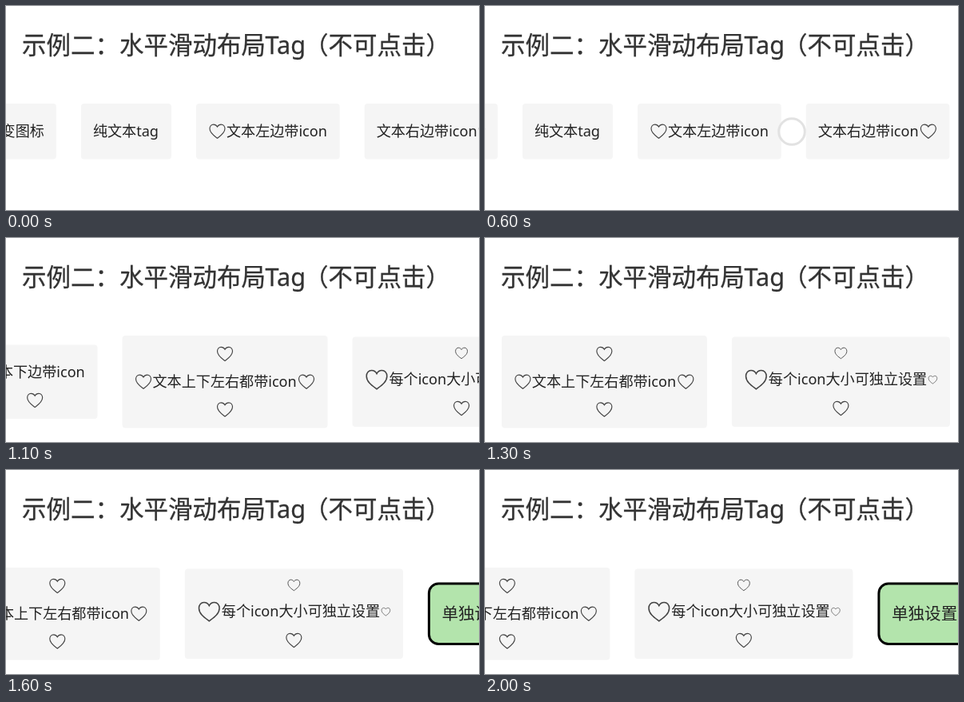
These frames come from a looping animation (592x255 px, 2.1 s). An HTML page:

```html
<!DOCTYPE html>
<html lang="zh-CN">
<head>
<meta charset="utf-8">
<style>
  html, body { margin: 0; width: 100%; height: 100%; overflow: hidden; background: #fff; }
  svg { display: block; }
  text { font-family: "Noto Sans", "Noto Sans CJK SC", "Noto Sans CJK", sans-serif; fill: #222; }
  .title text { font-size: 30.5px; fill: #333; stroke: #333; stroke-width: .3; }
  .heart { fill: none; stroke: #444; stroke-width: 1.15; }
</style>
</head>
<body>
<svg width="592" height="255" viewBox="0 0 592 255">
  <g class="title">
    <text x="20" y="60">示例二：水平滑动布局</text>
    <text x="324.5" y="60">Tag</text>
    <text x="373" y="60">（不可点击）</text>
  </g>
  <g id="strip"></g>
  <circle id="touch" cy="157" r="16.3" fill="#fff" fill-opacity=".75" stroke="#e2e2e2" stroke-width="3"/>
</svg>
<script>
const strip = document.getElementById('strip');
const touch = document.getElementById('touch');
const FONT = 18.1, ICON = 23, PAD_X = 15, PAD_Y = 11.5, ROW = 46.5, GAP = 31;
const VIEW = 592, LIST_TOP = 122;

const letterWidth = c => c > 'z' ? 1 : c === 'i' ? .41 : .53;
const textWidth = label => FONT * [...label].reduce((sum, c) => sum + letterWidth(c), 0);

const heart = (x, y, box) => box ?
  `<path class="heart" transform="translate(${x} ${y}) scale(${box / ICON})" d="M0 8.6
   C-4 5.6-9.5 2.1-9.5-3.4C-9.5-6.4-7.5-8.7-4.8-8.7C-2.6-8.7-.9-7.4 0-5.7
   C.9-7.4 2.6-8.7 4.8-8.7C7.5-8.7 9.5-6.4 9.5-3.4C9.5 2.1 4 5.6 0 8.6Z"/>` : '';

// A grey card sized by its label and the icons on its four sides.
function tag(label, { left = 0, right = 0, top = 0, bottom = 0 } = {}) {
  const textX = PAD_X + left;
  const textEnd = textX + textWidth(label);
  const row = Math.max(ROW, left + 17.5);
  const w = textEnd + right + PAD_X;
  const h = PAD_Y + top + row + bottom + PAD_Y;
  const midY = PAD_Y + top + row / 2;
  return { w, h, svg: `
    <rect width="${w}" height="${h}" rx="4" fill="#f5f5f5"/>
    <text x="${textX}" y="${midY + 6.2}" font-size="${FONT}">${label}</text>
    ${heart(PAD_X + left / 2, midY, left)}
    ${heart(textEnd + right / 2, midY, right)}
    ${heart(w / 2, PAD_Y + top / 2, top)}
    ${heart(w / 2, h - PAD_Y - bottom / 2, bottom)}` };
}

const styledTag = label => ({ w: 180, h: 78.5, svg: `
  <rect x="1.5" y="1.5" width="177" height="75.5" rx="12" fill="#b3e4ac" stroke="#000" stroke-width="3"/>
  <text x="17.5" y="46.5" font-size="20.6">${label}</text>` });

const tags = [
  tag('渐变图标'),
  tag('纯文本tag'),
  tag('文本左边带icon', { left: ICON }),
  tag('文本右边带icon', { right: ICON }),
  tag('文本上边带icon', { top: ICON }),
  tag('文本下边带icon', { bottom: ICON }),
  tag('文本上下左右都带icon', { left: ICON, right: ICON, top: ICON, bottom: ICON }),
  tag('每个icon大小可独立设置', { left: 31, right: 13, top: 18, bottom: ICON }),
  styledTag('单独设置样式')
];

let nextX = -39.5;
for (const t of tags) {
  t.x = nextX;
  nextX += t.w + GAP;
  t.node = document.createElementNS('http://www.w3.org/2000/svg', 'g');
  t.node.innerHTML = t.svg;
  strip.append(t.node);
}

// The strip rests, follows an accelerating finger, then glides to a stop.
const STEP = 100, LOOP = 2100, REST = 500, GLIDE = 4, END = 1148;
const drag = n => 47 * n ** 2.1;
const glide = n => END - 485 * Math.exp(-((n / 3.136) ** 1.033));

function draw(time) {
  const n = Math.max(0, Math.floor((time % LOOP - REST) / STEP));
  const scroll = n < GLIDE ? drag(n) : glide(n - GLIDE);

  // The list is as tall as its tallest visible tag; tags are centred in it.
  const visible = tags.filter(t => t.x < scroll + VIEW && t.x + t.w > scroll);
  const listHeight = Math.max(...visible.map(t => t.h));
  for (const t of tags) {
    const y = LIST_TOP + (listHeight - t.h) / 2;
    t.node.setAttribute('transform', `translate(${t.x - scroll} ${y})`);
  }
  touch.setAttribute('cx', 431 - scroll);
  touch.setAttribute('visibility', n ? 'visible' : 'hidden');
}

const begin = performance.now();
function tick() {
  draw(performance.now() - begin);
  requestAnimationFrame(tick);
}
tick();
</script>
</body>
</html>
```
